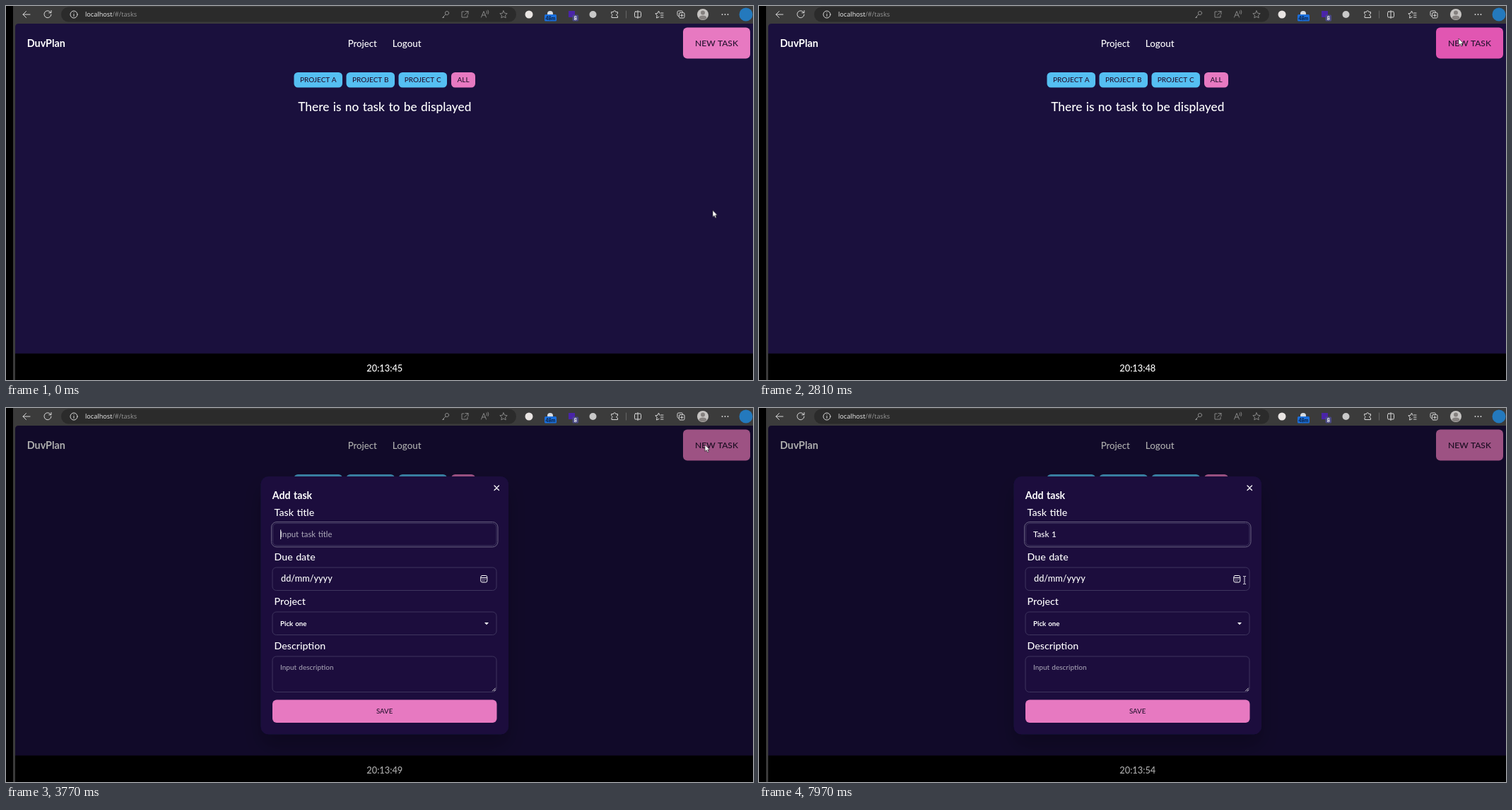
Animation, 1057 px wide and 530 px high, one loop 8000 ms. Source, as an HTML page:

```html
<!DOCTYPE html>
<html lang="en">
<head>
<meta charset="utf-8">
<title>Tasks</title>
<style>
html, body { margin: 0; width: 100%; height: 100%; overflow: hidden; background: #000; }
svg { display: block; }
text { font-family: Lato, sans-serif; font-weight: 500; word-spacing: .06em; white-space: pre; }
.mid { text-anchor: middle; }
.bold { font-weight: 700; }
.url { font: 9.2px "Open Sans", sans-serif; }
.white { fill: #fff; }
.ink { fill: #25122f; }
.pink { fill: #e779c1; }
.blue { fill: #55bff2; }
.hint { fill: #a39fb1; }
.line { fill: none; stroke: #d8d8d8; stroke-width: 1; stroke-linecap: round; stroke-linejoin: round; }
.dim { stroke: #858585; }
.field { fill: none; stroke: #3e355e; }

/* One loop: 1% = 80 ms */
#cursor, #arrow, #beam, #new, #newFill, #dialog { animation: 8s step-end infinite; }
#cursor { animation-name: move; }
#arrow { animation-name: arrow; }
#beam { animation-name: beam; }
#new { animation-name: press; transform-box: fill-box; transform-origin: center; }
#newFill { animation-name: hover; }
#dialog { animation-name: open; }
#box { animation: grow 8s step-end infinite; transform-box: fill-box; transform-origin: center; }

@keyframes move {
  0% { transform: translate(1000px, 289.5px); }
  .875% { transform: translate(997px, 276px); }
  2.125% { transform: translate(994px, 268px); }
  3.5% { transform: translate(991px, 292px); }
  4.75% { transform: translate(989px, 317px); }
  17.375% { transform: translate(1001px, 388px); }
  19.25% { transform: translate(1007px, 415px); }
  20.5% { transform: translate(1013px, 430px); }
  21.75% { transform: translate(1017px, 405px); }
  23% { transform: translate(1018px, 367px); }
  27.5% { transform: translate(1004px, 94px); }
  29.5% { transform: translate(993px, 42.5px); }
  30.875% { transform: translate(991px, 44px); }
  35.125% { transform: translate(990px, 46px); }
  38.125% { transform: translate(986px, 46px); }
  39.125% { transform: translate(981px, 46px); }
  41.125% { transform: translate(989px, 50px); }
  43.25% { transform: translate(989px, 52px); }
  49.75% { transform: translate(985px, 58px); }
  51% { transform: translate(948px, 72px); }
  52.25% { transform: translate(874px, 95px); }
  53.625% { transform: translate(730px, 135px); }
  54.875% { transform: translate(620px, 165px); }
  56.125% { transform: translate(540px, 179px); }
  57.5% { transform: translate(480px, 177px); }
  58.75% { transform: translate(449px, 174px); }
  59.875% { transform: translate(454px, 179px); }
  63.375% { transform: translate(454px, 177px); }
  64.5% { transform: translate(454px, 175px); }
  65.625% { transform: translate(454px, 173.5px); }
  95.25% { transform: translate(470px, 176px); }
  96.375% { transform: translate(540px, 195px); }
  97.5% { transform: translate(620px, 222px); }
  98.5% { transform: translate(670px, 240px); }
  99.625%, 100% { transform: translate(687px, 244px); }
}
@keyframes arrow { 0% { opacity: 1; } 54.875%, 100% { opacity: 0; } }
@keyframes beam { 0% { opacity: 0; } 54.875%, 100% { opacity: 1; } }
@keyframes press {
  0% { transform: none; }
  43.25% { transform: scale(.97); }
  44.25% { transform: scale(.976); }
  45.625%, 100% { transform: none; }
}
@keyframes hover {
  0% { fill: #e779c1; }
  30.875% { fill: #e467b9; }
  32.25% { fill: #e156b2; }
  45.625% { fill: #e467b9; }
  47.125%, 100% { fill: #e779c1; }
}
@keyframes open { 0% { opacity: 0; } 45.625% { opacity: .6; } 47.125%, 100% { opacity: 1; } }
@keyframes grow { 0% { transform: scale(.96); } 47.125%, 100% { transform: none; } }
</style>
</head>
<body>
<svg width="1057" height="530" viewBox="0 0 1057 530">
  <defs>
    <filter id="shadow" x="-20%" y="-20%" width="140%" height="150%">
      <feDropShadow dx="0" dy="16" stdDeviation="14" flood-color="#000" flood-opacity=".25"/>
    </filter>
    <path id="page" d="M13 530V30q0-5 5-5H1057V530Z"/>
    <path id="star" d="M0-5.2L1.6-1.8 5.2-1.4 2.5 1.1 3.2 4.8 0 3-3.2 4.8-2.5 1.1-5.2-1.4-1.6-1.8Z"/>
  </defs>

  <!-- Browser bar -->
  <rect x="10" width="1047" height="530" fill="#3b3b3b"/>
  <rect x="78" y="1.5" width="644" height="21" rx="10.5" fill="#2b2b2b"/>
  <g class="line">
    <path d="M34 12H24M28.500 7.500L24 12l4.500 4.500"/>
    <path d="M63.500 9.500A5 5 0 1 0 64 12M64 6.500V9.700H60.800"/>
    <circle cx="96" cy="12" r="5"/>
    <path d="M96 11.500V14.500M96 9.300V9.400"/>
  </g>
  <text class="url" x="112" y="15.300" fill="#f2f2f2">localhost<tspan fill="#969696">/#/tasks</tspan></text>
  <g class="line dim">
    <circle cx="624" cy="10" r="2.600"/>
    <path d="M622 12L617.500 16.500H619.500V15"/>
    <path d="M648 8H645V16H653V13M650 7.500H654V11.500M654 7.500L648.500 13"/>
    <path d="M672.500 16L676 7.500 679.500 16M673.800 13H678.200M680 7q1.500 1.500 0 3.500M682 6q2 2.500 0 5.500"/>
    <use href="#star" x="704" y="12"/>
  </g>
  <circle cx="740" cy="12" r="5.500" fill="#e9e5e3"/>
  <circle cx="770" cy="11" r="4" fill="#d5dbe2"/>
  <rect x="762" y="12" width="17" height="9.500" rx="1.500" fill="#1a6fdc"/>
  <text class="mid bold" x="770.500" y="19.600" font-size="7" fill="#0b1a33">48m</text>
  <rect x="796" y="7" width="9" height="9" fill="#4a24a8"/>
  <rect x="801.500" y="12.500" width="8.500" height="9" rx="1.500" fill="#4b4a86"/>
  <text class="mid bold white" x="805.800" y="19.800" font-size="7.500">8</text>
  <circle cx="830.500" cy="12" r="5" fill="#c9c9c9"/>
  <g class="line">
    <path d="M857 8.500H859.500a1.700 1.700 0 0 1 3.400 0H865.500V11a1.600 1.600 0 1 0 0 3.200V16.500H857V14a1.700 1.700 0 0 0 0-3Z"/>
    <path d="M877.500 7V17" stroke="#666"/>
    <rect x="889.500" y="8" width="9" height="8" rx="1.500"/>
    <path d="M894 6.500V17.500"/>
    <path d="M924 15.500L920.500 17 921.200 13.200 918.800 10.800 922 10.300 923.500 7 925 10.300M926.500 10H930M926.500 13H930M926.500 16H930"/>
    <path d="M951.500 14.500Q950 14 950 12.500V8.500Q950 7 951.500 7H956Q957.500 7 957.500 8.500"/>
    <rect x="952.500" y="9.500" width="7.500" height="7.500" rx="1.500"/>
    <path d="M954.500 13.300H958M956.200 11.500V15"/>
  </g>
  <circle cx="986" cy="12" r="8" fill="#c6c4c2"/>
  <circle cx="986" cy="9.500" r="3" fill="#85817f"/>
  <path d="M980.500 17.500q0-4 5.500-4t5.500 4q-5.500 4-11 0Z" fill="#85817f"/>
  <g fill="#dcdcdc"><circle cx="1013.500" cy="12" r=".9"/><circle cx="1017.500" cy="12" r=".9"/><circle cx="1021.500" cy="12" r=".9"/></g>
  <circle cx="1047" cy="12" r="9.500" fill="#2479bd"/>

  <!-- Page -->
  <use href="#page" fill="#1a103d"/>
  <rect x="13" y="492.500" width="1044" height="37.500"/>
  <text class="bold white" x="29.700" y="58" font-size="14.400">DuvPlan</text>
  <text class="mid white" x="504.300" y="58" font-size="13.200">Project</text>
  <text class="mid white" x="567.200" y="58" font-size="13.400">Logout</text>
  <g id="new">
    <rect id="newFill" class="pink" x="958" y="30.500" width="95" height="44" rx="6"/>
    <text class="mid ink" x="1005.500" y="57" font-size="12">NEW TASK</text>
  </g>
  <g id="filters" font-size="10"></g>
  <text class="mid white" x="535.800" y="149" font-size="17.300">There is no task to be displayed</text>
  <text id="clock" class="mid white" x="535.800" y="518.300" font-size="12.800"></text>

  <!-- Dialog -->
  <g id="dialog">
    <use href="#page" fill="#000" fill-opacity=".32"/>
    <g id="box">
      <rect x="360.500" y="97" width="350.500" height="365.500" rx="11" fill="#1a103d" filter="url(#shadow)"/>
      <path class="line" style="stroke:#fff;stroke-width:1.300" d="M691 110L697.500 116.500M697.500 110L691 116.500"/>
      <text class="bold white" x="376.800" y="128.500" font-size="14.200">Add task</text>
      <g class="white" font-size="14.200">
        <text x="379.600" y="153">Task title</text>
        <text x="379.600" y="216">Due date</text>
        <text x="379.600" y="279">Project</text>
        <text x="379.600" y="342">Description</text>
      </g>
      <g class="field">
        <rect x="375.500" y="161.500" width="320.500" height="35.500" rx="7.500" stroke="#686180"/>
        <rect x="377.500" y="163.500" width="316.500" height="31.500" rx="5.500"/>
        <rect x="377" y="226" width="317" height="32.500" rx="5.500"/>
        <rect x="377" y="289" width="317" height="32.500" rx="5.500"/>
        <rect x="377" y="352" width="317" height="50.500" rx="5.500"/>
      </g>
      <text id="hint" class="hint" x="388" y="183.300" font-size="11.300">Input task title</text>
      <text id="typed" class="white" x="388" y="183.300" font-size="11.600"></text>
      <rect id="caret" class="white" y="172.500" width="1" height="13.500"/>
      <text class="white" x="389" y="246" font-size="12.700">dd/mm/yyyy</text>
      <g class="line" style="stroke:#fff">
        <rect x="671.800" y="237.500" width="9" height="9.500" rx="2"/>
        <path d="M672 240.500H680.500M674.300 242.800H674.400M676.300 242.800H676.400M678.300 242.800H678.400M674.300 244.800H674.400M676.300 244.800H676.400"/>
      </g>
      <text class="bold white" x="388" y="308.800" font-size="9.700">Pick one</text>
      <path class="white" d="M677 304H683L680 307.200Z"/>
      <text class="hint" x="388" y="371.300" font-size="10">Input description</text>
      <path class="line" d="M688.500 401L692.500 397M691 401L692.500 399.500" stroke-width=".8"/>
      <rect class="pink" x="377" y="413.500" width="317.500" height="32.500" rx="6"/>
      <text class="mid ink" x="535.600" y="433" font-size="9.600">SAVE</text>
    </g>
  </g>

  <g id="cursor">
    <path id="arrow" d="M0 0V9.500L2.200 7.500 3.700 10.900 5.300 10.200 3.800 7H6.700Z" fill="#fff" stroke="#111" stroke-width=".6"/>
    <path id="beam" d="M-2-5.500H-.6L0-5 .6-5.500H2M0-5V5M-2 5.500H-.6L0 5 .6 5.500H2" fill="none" stroke="#dedbe6" stroke-width="1"/>
  </g>
</svg>
<script>
const LOOP = 8000;
const start = performance.now();
const el = id => document.getElementById(id);

// Filter pills: label, left edge, width, colour
el('filters').innerHTML = [
  ['PROJECT A', 407.5, 68.5, 'blue'],
  ['PROJECT B', 481.5, 68.5, 'blue'],
  ['PROJECT C', 555.5, 68.5, 'blue'],
  ['ALL', 630, 34, 'pink']
].map(([label, x, w, tone]) =>
  `<rect class="${tone}" x="${x}" y="94" width="${w}" height="21.500" rx="5.500"/>` +
  `<text class="mid ink" x="${x + w / 2}" y="108.200">${label}</text>`
).join('');

// Each track lists [time in ms, value]
const seconds = [[0, 45], [170, 46], [2200, 48], [3050, 49], [4180, 50],
  [5070, 51], [5970, 52], [7100, 53], [7800, 54]];
const typing = [[0, ''], [5970, 'T'], [6350, 'Ta'], [6750, 'Task'], [7100, 'Task '], [7400, 'Task 1']];
const blink = [[0, 1], [4290, 0], [4700, 1], [5070, 0], [5650, 1], [7800, 0]];

const at = (track, t) => track.findLast(([time]) => time <= t)[1];

function draw() {
  const t = Math.max(0, performance.now() - start) % LOOP;
  const value = at(typing, t);
  const typed = el('typed');
  el('clock').textContent = '20:13:' + at(seconds, t);
  typed.textContent = value;
  el('hint').setAttribute('opacity', value ? 0 : 1);
  const width = value ? typed.getComputedTextLength() : 0;
  el('caret').setAttribute('x', 388.2 + width);
  el('caret').setAttribute('opacity', at(blink, t));
  requestAnimationFrame(draw);
}
draw();
</script>
</body>
</html>
```
